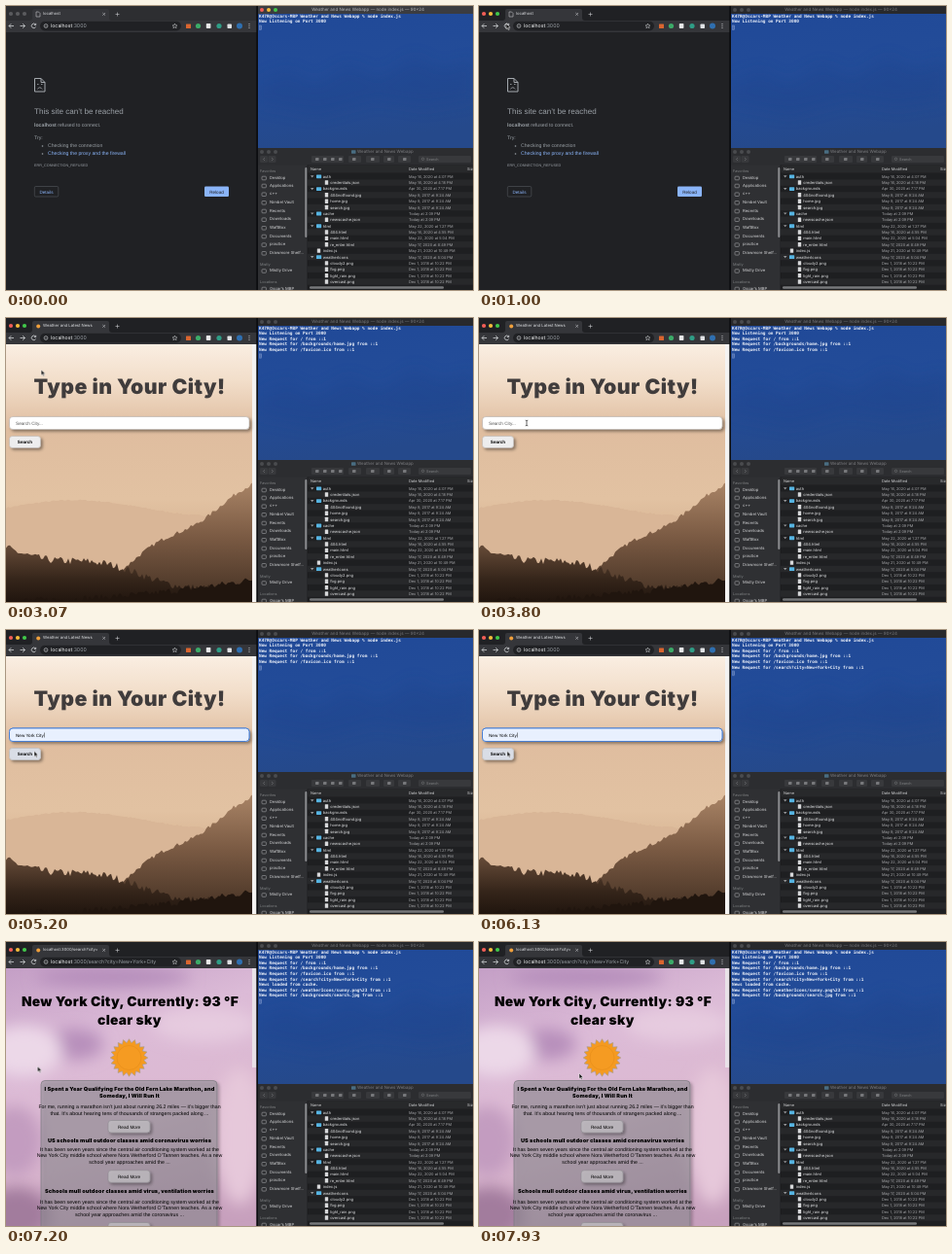
An HTML page that plays this animation: 480 by 292 pixels, repeating every 8000 ms.

```html
<!DOCTYPE html>
<html lang="en">
<head>
<meta charset="utf-8">
<title>Weather and News Webapp</title>
<style>
html, body { margin: 0; width: 100%; height: 100%; overflow: hidden; background: #0c0d10; }
svg { display: block; width: 100vw; height: 100vh; }
text { font: 4.2px Inter, sans-serif; dominant-baseline: central; text-rendering: geometricPrecision; white-space: pre; }
.mid text, text.mid { text-anchor: middle; }
.arial text { font-family: "Liberation Sans", Arial, sans-serif; }
.arial text.black { font-family: Inter, sans-serif; font-weight: 900; letter-spacing: .02em; }
.mono text { font: bold 4.42px "DejaVu Sans Mono", monospace; fill: #eef2fa; }

/* one 8 s loop; .on parts switch in and stay */
.on { animation: 8s step-end infinite; }
@keyframes blur { 0% { opacity: 0 } 6.25%, to { opacity: 1 } }
@keyframes load { 0% { opacity: 0 } 26.6%, to { opacity: 1 } }
@keyframes home { 0% { opacity: 0 } 27.5%, to { opacity: 1 } }
@keyframes photo { 0% { opacity: 0 } 31.6%, to { opacity: 1 } }
@keyframes icon { 0% { opacity: 0 } 32.5%, to { opacity: 1 } }
@keyframes focus { 0% { opacity: 0 } 49.1%, to { opacity: 1 } }
@keyframes fill { 0% { opacity: 0 } 57.5%, to { opacity: 1 } }
@keyframes query { 0% { opacity: 0 } 75.9%, to { opacity: 1 } }
@keyframes cache { 0% { opacity: 0 } 77.5%, to { opacity: 1 } }
@keyframes result { 0% { opacity: 0 } 80%, to { opacity: 1 } }
@keyframes clouds { 0% { opacity: 0 } 87.5%, to { opacity: 1 } }
@keyframes key { 0% { fill-opacity: 0 } 50%, to { fill-opacity: 1 } }
@keyframes prompt {
  0% { transform: translateY(0) }
  26.6% { transform: translateY(5.55px) }
  27.5% { transform: translateY(11.1px) }
  32.5% { transform: translateY(16.65px) }
  75.9% { transform: translateY(22.2px) }
  77.5% { transform: translateY(27.75px) }
  80%, to { transform: translateY(38.85px) }
}
.key { animation: key 8s step-end infinite; }
#pointer { animation: move 8s ease-in-out infinite; }
@keyframes move {
  0%, 1% { transform: translate(285px, 60px) }
  6% { transform: translate(180px, 50px) }
  11.3%, 32.5% { transform: translate(28px, 18px) }
  46%, 56.5% { transform: translate(49px, 108px) }
  58.4% { transform: translate(34px, 119px) }
  61.6%, 76% { transform: translate(29px, 124.5px) }
  83%, 87.5% { transform: translate(24px, 127px) }
  98.5%, to { transform: translate(103px, 135px) }
}
#arrow { animation: arrow 8s step-end infinite; }
#beam { animation: beam 8s step-end infinite; }
@keyframes arrow { 0% { opacity: 0 } 1% { opacity: 1 } 44% { opacity: 0 } 57.8%, to { opacity: 1 } }
@keyframes beam { 0% { opacity: 0 } 44% { opacity: 1 } 57.8%, to { opacity: 0 } }
</style>
</head>
<body>
<svg viewBox="0 0 480 292">
  <defs>
    <linearGradient id="dawn" x2="0" y2="1">
      <stop stop-color="#faeee2"/><stop offset=".14" stop-color="#f2deca"/>
      <stop offset=".33" stop-color="#dfbd9f"/><stop offset=".6" stop-color="#e2c2a2"/>
      <stop offset="1" stop-color="#c39b79"/>
    </linearGradient>
    <linearGradient id="slope" x2="0" y2="1">
      <stop stop-color="#a98466"/><stop offset=".35" stop-color="#7a5a43"/><stop offset="1" stop-color="#22170f"/>
    </linearGradient>
    <linearGradient id="wood" x2="0" y2="1">
      <stop stop-color="#664b38"/><stop offset=".6" stop-color="#35251a"/><stop offset="1" stop-color="#20150e"/>
    </linearGradient>
    <linearGradient id="dusk" x2=".3" y2="1">
      <stop stop-color="#c49fc6"/><stop offset=".35" stop-color="#dcbbd7"/>
      <stop offset=".7" stop-color="#dcb9d1"/><stop offset="1" stop-color="#c7a0bd"/>
    </linearGradient>
    <linearGradient id="shell" x2=".2" y2="1">
      <stop stop-color="#204998"/><stop offset=".5" stop-color="#234c98"/><stop offset="1" stop-color="#25498b"/>
    </linearGradient>
    <filter id="soft" x="-50%" y="-50%" width="200%" height="200%"><feGaussianBlur stdDeviation="8"/></filter>
    <filter id="drop" x="-20%" y="-40%" width="140%" height="200%">
      <feDropShadow dx="2" dy="2" stdDeviation="1.6" flood-opacity=".4"/>
    </filter>
    <clipPath id="page"><path d="M0 27H257.500V292H0z"/></clipPath>
  </defs>

  <!-- terminal -->
  <path fill="#3b3c40" d="M258 0H480V8H258z"/>
  <g id="lights"></g>
  <text class="mid" x="372" y="4" fill="#b9babd" style="font-size:4.5px">Weather and News Webapp — node index.js — 90×24</text>
  <g class="on" style="animation-name:blur">
    <path fill="#28292c" d="M258 0H480V8H258z"/>
    <g fill="#4a4b4e"><circle cx="263" cy="4" r="2"/><circle cx="270" cy="4" r="2"/><circle cx="277" cy="4" r="2"/></g>
    <text class="mid" x="372" y="4" fill="#77787b" style="font-size:4.5px">Weather and News Webapp — node index.js — 90×24</text>
  </g>
  <path fill="url(#shell)" d="M258 8H480V146H258z"/>
  <path fill="#1d428c" opacity=".35" d="M258 78L290 66 318 80 352 60 384 74 420 52 448 66 480 56V96L430 104 380 96 320 112 258 100z" filter="url(#soft)"/>
  <g id="log" class="mono"></g>

  <!-- file browser -->
  <g id="finder"></g>

  <!-- browser window -->
  <path fill="#2d2e31" d="M0 0H258V16H0z"/>
  <g fill="#5a5b5e"><circle cx="5" cy="8" r="2.1"/><circle cx="12" cy="8" r="2.1"/><circle cx="19" cy="8" r="2.1"/></g>
  <g class="on" style="animation-name:blur">
    <path fill="#202124" d="M0 0H258V16H0z"/>
    <circle cx="5" cy="8" r="2.1" fill="#f25e57"/><circle cx="12" cy="8" r="2.1" fill="#f6bd3b"/><circle cx="19" cy="8" r="2.1" fill="#41c84a"/>
  </g>
  <path fill="#35363a" d="M24 15Q27 15 27 12V5Q27 3 29 3H104Q106 3 106 5V12Q106 15 109 15H258V27H0V15z"/>
  <path d="M31 6H33.500L35 7.500V11H31z" fill="none" stroke="#c3c5c8" stroke-width=".6"/>
  <text x="38" y="8.500" fill="#dfe1e4">localhost</text>
  <path d="M99.300 7L102 9.700M102 7L99.300 9.700M112.500 8.500H116.500M114.500 6.500V10.500" stroke="#c3c5c8" stroke-width=".6"/>
  <rect x="35" y="15.800" width="145" height="9.600" rx="4.800" fill="#202124"/>
  <g fill="none" stroke="#d0d2d5" stroke-width=".8">
    <path d="M8 20.500H3M5.300 18.200L3 20.500 5.300 22.800M14.500 20.500H19.500M17.200 18.200L19.500 20.500 17.200 22.800M30.400 19A2.300 2.300 0 1 0 30.600 21.500M30.700 17.800V19.600H28.900"/>
    <circle cx="41" cy="20.500" r="1.900" stroke-width=".6"/>
    <path stroke-width=".5" d="M41 20.300V21.600M41 19.300V19.600M173.500 18L174.200 19.800 176 19.900 174.600 21 175.100 22.800 173.500 21.800 171.900 22.800 172.400 21 171 19.900 172.800 19.800z"/>
  </g>
  <g id="tools"></g>
  <text x="46" y="20.600" fill="#f1f3f4" style="font-size:5.200px">localhost<tspan fill="#9aa0a6">:3000</tspan></text>

  <!-- error page -->
  <g class="arial" fill="#9aa0a6">
    <path fill="#202124" d="M0 27H258V292H0z"/>
    <path d="M29.500 74.500H36L40 78.500V88H29.500zM36 74.500V78.500H40" fill="none" stroke="#a4a9ae"/>
    <path d="M32 80.500H33.500M36 80.500H37.500M32.300 85.500Q34.700 82 37.200 85.500" fill="none" stroke="#a4a9ae" stroke-width=".8"/>
    <g id="error"></g>
    <rect x="29.300" y="185.500" width="24.500" height="10.500" rx="1.300" fill="none" stroke="#5f6368" stroke-width=".5"/>
    <rect x="204" y="185.500" width="25" height="10.500" rx="1.300" fill="#8ab4f8"/>
    <g class="mid"><text x="41.500" y="191" fill="#8ab4f8" style="font-size:4.600px">Details</text><text x="216.500" y="191" fill="#202124" style="font-size:4.600px">Reload</text></g>
  </g>

  <!-- search page -->
  <g class="on arial" style="animation-name:load" clip-path="url(#page)">
    <path fill="#fff" d="M0 27H258V292H0z"/>
    <g id="hills" class="on" style="animation-name:photo"></g>
    <path fill="#f4f3f2" d="M253 27H258V292H253z"/>
    <text class="mid black" x="127" y="71" fill="#403c3c" style="font-size:21.300px">Type in Your City!</text>
    <g filter="url(#drop)">
      <rect x="3.500" y="101.500" width="246.500" height="13" rx="3.500" fill="#fff" stroke="#a9a5a3" stroke-width=".5"/>
      <rect x="3.500" y="121.500" width="32" height="12" rx="3" fill="#ededee" stroke="#b5b3b3" stroke-width=".5"/>
    </g>
    <text x="10" y="108" fill="#555" style="font-size:4.700px">Search City...</text>
    <rect class="on" style="animation-name:focus" x="3.500" y="101" width="246.500" height="13.500" rx="3.500" fill="#fff" stroke="#4a80d4"/>
    <g class="on" style="animation-name:fill">
      <rect x="3.500" y="101" width="246.500" height="13.500" rx="3.500" fill="#e8f0fe" stroke="#4a80d4"/>
      <path d="M39.500 105.500V110.500" stroke="#222" stroke-width=".5"/>
      <rect x="3.500" y="121.500" width="32" height="12" rx="3" fill="#d9dde6" stroke="#b5b3b3" stroke-width=".5"/>
    </g>
    <text id="typed" x="10" y="108" style="font-size:4.600px"></text>
    <text class="mid" x="19.500" y="127.500" style="font-size:4.600px;font-weight:bold">Search</text>
  </g>
  <g class="on" style="animation-name:load">
    <path fill="#35363a" d="M30 5H97V13H30z"/>
    <circle cx="33.200" cy="8.500" r="2" fill="#f0a03c"/>
    <text x="38" y="8.500" fill="#dfe1e4">Weather and Latest News</text>
  </g>

  <!-- result page -->
  <g class="on arial" style="animation-name:result">
    <path fill="#35363a" d="M37 5H97V13H37z"/>
    <text x="38" y="8.500" fill="#dfe1e4" style="font:4.200px Inter,sans-serif">localhost:3000/search?city=</text>
    <path fill="#202124" d="M45 17H160V24H45z"/>
    <text x="46" y="20.600" fill="#f1f3f4" style="font:5.200px Inter,sans-serif">localhost<tspan fill="#9aa0a6">:3000/search?city=New+York+City</tspan></text>
    <g class="mid" clip-path="url(#page)">
      <path fill="#fff" d="M0 27H258V292H0z"/>
      <g class="on" style="animation-name:clouds">
        <path fill="url(#dusk)" d="M0 27H258V292H0z"/>
        <g filter="url(#soft)">
          <ellipse cx="110" cy="36" rx="80" ry="10" fill="#b48cba"/>
          <ellipse cx="70" cy="105" rx="30" ry="16" fill="#b78fbb"/>
          <ellipse cx="18" cy="112" rx="40" ry="26" fill="#ecd8e8"/>
          <ellipse cx="205" cy="85" rx="55" ry="18" fill="#e6cbdf"/>
          <ellipse cx="240" cy="200" rx="26" ry="70" fill="#e6c8da"/>
          <ellipse cx="8" cy="205" rx="30" ry="36" fill="#c39cc0"/>
          <ellipse cx="10" cy="280" rx="36" ry="28" fill="#a27b9d"/>
        </g>
        <path fill="#e9e2e8" d="M253 27H258V129H253z"/>
      </g>
      <text class="black" x="127.500" y="62" style="font-size:13.800px">New York City, Currently: 93 °F</text>
      <text class="black" x="127" y="81" style="font-size:13.800px">clear sky</text>
      <g id="sun" transform="translate(126.500 119)"></g>
      <rect x="36" y="142.500" width="181" height="170" rx="4" fill="#8f8f94" fill-opacity=".5" stroke="#77777c" stroke-width=".7" filter="url(#drop)"/>
      <g id="news"></g>
    </g>
  </g>
  <path fill="#0c0d10" d="M257.300 0H259V292H257.300z"/>

  <g id="pointer">
    <path id="arrow" d="M0 0V5.600L1.300 4.500 2.200 6.600 3.200 6.200 2.300 4.200H4z" fill="#111" stroke="#fff" stroke-width=".5"/>
    <path id="beam" d="M-1.300 -2.800Q0 -2.800 0 -2 0 -2.800 1.300 -2.800M0 -2V2M-1.300 2.800Q0 2.800 0 2 0 2.800 1.300 2.800" fill="none" stroke="#222" stroke-width=".7"/>
  </g>
</svg>
<script>
const put = (id, html) => { document.getElementById(id).innerHTML = html; };
const text = (x, y, str, more = '') => `<text x="${x}" y="${y}" ${more}>${str}</text>`;
const box = (x, y, w, h, fill, rx = 0) => `<rect x="${x}" y="${y}" width="${w}" height="${h}" rx="${rx}" fill="${fill}"/>`;
const dot = (x, y, r, fill) => `<circle cx="${x}" cy="${y}" r="${r}" fill="${fill}"/>`;
let seed = 7;
const rand = () => (seed = seed * 16807 % 2147483647) / 2147483647;

put('lights', ['#f25e57', '#f6bd3b', '#41c84a'].map((c, i) => dot(263 + 7 * i, 4, 2, c)).join(''));

// terminal lines with the cue that reveals each
const log = [
  ['', 'K47R@Oscars-MBP Weather and News Webapp % node index.js'],
  ['', 'Now Listening on Port 3000'],
  ['load', 'New Request for / from ::1'],
  ['home', 'New Request for /backgrounds/home.jpg from ::1'],
  ['icon', 'New Request for /favicon.ico from ::1'],
  ['query', 'New Request for /search?city=New+York+City from ::1'],
  ['cache', 'News loaded from cache.'],
  ['result', 'New Request for /weatherIcons/sunny.png%23 from ::1'],
  ['result', 'New Request for /backgrounds/search.jpg from ::1']
];
put('log', log.map(([cue, s], i) =>
  text(260, 11.3 + 5.55 * i, s, cue && `class="on" style="animation-name:${cue}"`)).join('') +
  `<rect class="on" style="animation-name:prompt" x="260.500" y="20" width="2.300" height="4.600" fill="#9fb4dc" fill-opacity=".3" stroke="#8fa6d4" stroke-width=".4"/>`);

// file browser
const places = [
  [177, 'Desktop'], [185, 'Applications'], [193.7, 'c++'], [202.3, 'Nimbel Vault'], [211, 'Recents'],
  [219.7, 'Downloads'], [228.3, 'WaftBox'], [237, 'Documents'], [245.6, 'practice'],
  [254.3, 'Drawmore Shelf...'], [272.5, 'Mistly Drive'], [291, 'Oscar’s MBP']
];
const files = [
  ['auth/', 'May 16, 2020 at 4:07 PM'], ['credentials.json', 'May 16, 2020 at 4:18 PM'],
  ['backgrounds/', 'Apr 30, 2020 at 7:17 PM'], ['404notfound.jpg', 'May 9, 2017 at 9:24 AM'],
  ['home.jpg', 'May 9, 2017 at 9:24 AM'], ['search.jpg', 'May 9, 2017 at 9:24 AM'],
  ['cache/', 'Today at 2:09 PM'], ['newscache.json', 'Today at 2:09 PM'],
  ['html/', 'May 22, 2020 at 1:27 PM'], ['404.html', 'May 16, 2020 at 4:55 PM'],
  ['main.html', 'May 22, 2020 at 5:04 PM'], ['re_enter.html', 'May 17, 2020 at 8:49 PM'],
  ['index.js', 'May 21, 2020 at 10:49 PM'], ['weatherIcons/', 'May 17, 2020 at 5:04 PM'],
  ...['cloudy2', 'fog', 'light_rain', 'overcast'].map(n => [n + '.png', 'Dec 1, 2018 at 10:22 PM'])
];
const row = ([name, date], i) => {
  const y = 175.2 + 6.37 * i, dir = name.endsWith('/'), top = dir || name === 'index.js';
  const x = top ? 319 : 327;
  return (i % 2 ? box(310, y - 3.2, 170, 6.4, '#27282a') : '') +
    (dir ? `<path d="M313 ${y - 1}H316.500L314.700 ${y + 1.2}z" fill="#98999c"/>` +
      box(x, y - 1.8, 5.2, 3.8, '#56b4e2', .6) : box(x + .8, y - 2.2, 3.4, 4.4, '#d7d8da', .3)) +
    text(x + 7 - (top ? .3 : .8), y, name.replace('/', ''), 'style="font-size:4.050px" fill="#e2e3e5"') +
    text(414, y, date, 'style="font-size:3.900px" fill="#a9aaad"');
};
const grey = 'fill="#7f8083" style="font-size:3.800px"';
put('finder',
  box(258, 147, 222, 145, '#1e1f21') + box(258, 163, 52, 129, '#2f3033') + box(258, 146, 222, 17.5, '#2c2d30') +
  [263, 270, 277].map(x => dot(x, 150, 2, '#4a4b4e')).join('') +
  box(355, 148.3, 4.5, 3.4, '#496d82', .5) + text(361, 150, 'Weather and News Webapp', 'fill="#7c7d80" style="font-size:4.400px"') +
  [[261, 8], [269.5, 8], [314, 33], [352, 13], [370, 14], [388, 11], [403, 13], [424, 54]]
    .map(([x, w]) => box(x, 154, w, 7, '#38393c', 1.3)).join('') +
  [318, 326, 334, 342, 356, 375, 392, 408].map(x => box(x, 156, 3.5, 3, '#77787b', .4)).join('') +
  '<path d="M266 156L264.500 157.500 266 159M273 156L274.500 157.500 273 159" fill="none" stroke="#77787b" stroke-width=".6"/>' +
  text(432, 157.6, 'Search', grey) + `<circle cx="428.500" cy="157.300" r="1.200" fill="none" stroke="#7f8083" stroke-width=".5"/>` +
  box(310, 163.5, 170, 8, '#28292b') + box(309.7, 163.5, .5, 129, '#151618') +
  ['Name', 'Date Modified', 'Size'].map((s, i) => text([313, 414, 474][i], 167.6, s, 'fill="#d2d3d5" style="font-size:3.950px"')).join('') +
  text(261, 169, 'Favorites', grey) + text(261, 265, 'Mistly', grey) + text(261, 283.7, 'Locations', grey) +
  places.map(([y, s]) => `<rect x="263" y="${y - 1.8}" width="4.400" height="3.600" rx=".8" fill="none" stroke="#a2a3a6" stroke-width=".6"/>` +
    text(271, y, s, 'fill="#d6d7d9"')).join('') +
  files.map(row).join('') +
  box(307.3, 166, 2, 72, '#8b8c8f', 1) + box(312, 288.3, 138, 2.4, '#77787b', 1.2));

// toolbar icons
put('tools',
  box(185, 18.5, 5, 4.5, '#d9652f', .5) + dot(197.5, 20.5, 2.6, '#3cab68') + box(205.8, 18, 4.6, 5, '#e8e9ea', .7) +
  dot(219, 20.5, 2.6, '#2f9d86') + box(227.5, 18.5, 4.5, 4.5, '#dfe1e4', .8) + dot(240, 20.5, 3, '#2f6fb0') +
  [18.5, 20.5, 22.5].map(y => dot(250, y, .6, '#d0d2d5')).join(''));

put('error',
  text(29, 108.5, 'This site can’t be reached', 'style="font-size:8.050px"') +
  text(29, 123, '<tspan font-weight="bold">localhost</tspan> refused to connect.', 'style="font-size:5.200px"') +
  text(29, 135.5, 'Try:', 'style="font-size:5.200px"') +
  dot(37.5, 144, .8, '#9aa0a6') + dot(37.5, 152, .8, '#9aa0a6') +
  text(43, 144, 'Checking the connection', 'style="font-size:5.150px"') +
  text(43, 152, 'Checking the proxy and the firewall', 'style="font-size:5.150px" fill="#8ab4f8"') +
  text(29, 164.3, 'ERR_CONNECTION_REFUSED', 'style="font-size:3.750px"'));

// misty hills: a wooded slope from the right, a dark wood on the left
const ridge = (fill, jag, f) => {
  let d = 'M0 292';
  for (let x = 0; x <= 256; x += 2) d += `L${x} ${(f(x) - jag * rand()).toFixed(1)}`;
  return `<path fill="${fill}" d="${d}V292z"/>`;
};
put('hills', box(0, 27, 258, 265, 'url(#dawn)') +
  ridge('#d9b697', 1.5, x => 196 - 8 * Math.sin(x / 45)) +
  ridge('url(#slope)', 4, x => 174 + .62 * (255 - x) + 3 * Math.sin(x / 14)) +
  ridge('url(#wood)', 8, x => 240 + .2 * x + 4 * Math.sin(x / 22)) +
  ridge('#20150e', 7, x => 294 - 22 * (x / 255) ** 2));

put('typed', [...'New York City'].map((c, i) =>
  `<tspan class="key" style="animation-delay:${4000 + 46 * i - 12000}ms">${c}</tspan>`).join(''));

// sun: spiky rim around a disc
const rim = Array.from({ length: 40 }, (_, i) => {
  const r = i % 2 ? 15.5 : 19.3, a = i * Math.PI / 20;
  return `${(r * Math.sin(a)).toFixed(1)},${(-r * Math.cos(a)).toFixed(1)}`;
}).join(' ');
put('sun', `<polygon points="${rim}" fill="#f59a20" stroke="#a09a90" stroke-width=".6"/>` +
  '<circle r="12.500" fill="#f59b22" stroke="#e48d1c" stroke-width=".6"/>');

// articles
const head = (y, s) => text(127, y, s, 'class="black" style="font-size:5.550px"');
const body = (y, lines) => lines.map((s, i) => text(127, y + 6.5 * i, s, 'style="font-size:5.280px"')).join('');
const more = y => `<rect x="105" y="${y - 6.5}" width="43" height="12.500" rx="3" fill="#c3c1c5" fill-opacity=".75" stroke="#8d8b90" stroke-width=".6" filter="url(#drop)"/>` +
  text(126.5, y, 'Read More', 'style="font-size:4.700px"');
const school = end => ['It has been seven years since the central air conditioning system worked at the',
  'New York City middle school where Nora Wetherford O’Tannen teaches. As a new', `school year approaches amid the ${end}...`];
put('news',
  head(152, 'I Spent a Year Qualifying For the Old Fern Lake Marathon, and') + head(159, 'Someday, I Will Run It') +
  body(170, ['For me, running a marathon isn’t just about running 26.2 miles — it’s bigger than',
    'that. It’s about hearing tens of thousands of strangers packed along ...']) + more(190) +
  head(205, 'US schools mull outdoor classes amid coronavirus worries') + body(213.7, school('')) + more(241.3) +
  head(256.5, 'Schools mull outdoor classes amid virus, ventilation worries') + body(267.5, school('coronavirus ')) + more(295));
</script>
</body>
</html>
```
